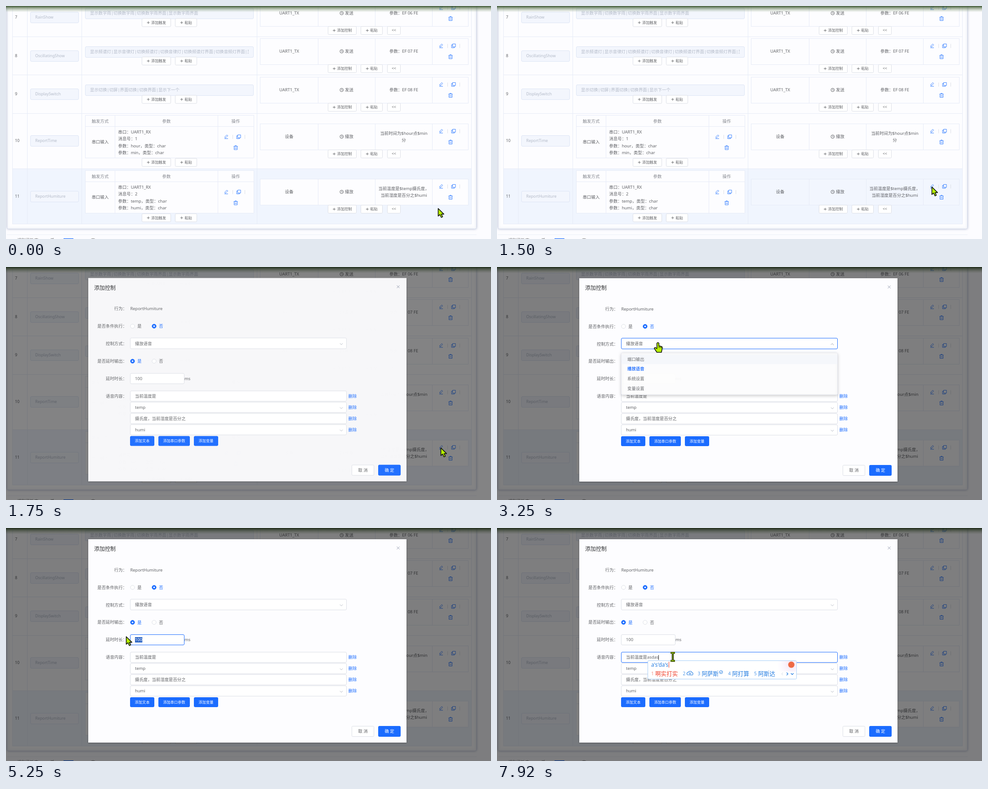
Recreate the animation shown at these times as an HTML page with a canvas. Size 1079x519 px, loop 8 s.

```html
<!DOCTYPE html>
<html lang="zh-CN">
<head>
<meta charset="utf-8">
<style>
html, body { margin: 0; width: 100%; height: 100%; overflow: hidden; background: #fcfcff; }
canvas { display: block; }
</style>
</head>
<body>
<canvas id="stage" width="1079" height="519"></canvas>
<script>
const ctx = document.getElementById('stage').getContext('2d');
const W = 1079, H = 519, LOOP = 8000;
const FAMILY = '"Noto Sans", "Noto Sans CJK SC", "Noto Sans CJK", sans-serif';
const BLUE = '#1b6cff', TEXT = '#606266', LINE = '#dcdfe6', GRID = '#e6ebf7', LIME = '#b8f400';

const clamp = (v, a = 0, b = 1) => Math.min(b, Math.max(a, v));
const ramp = (t, start, length) => clamp((t - start) / length);
const easeOut = (p, n) => 1 - Math.pow(1 - p, n);

// ---- drawing helpers ----
function text(str, x, cy, { size = 9.4, color = TEXT, align = 'left', weight = 400 } = {}) {
  ctx.font = `${weight} ${size}px ${FAMILY}`;
  ctx.textAlign = align;
  ctx.fillStyle = color;
  ctx.fillText(str, x, cy + size * 0.36);
}

function box(x, y, x2, y2, fill, stroke, r = 2.5) {
  ctx.beginPath();
  ctx.roundRect(x + 0.5, y + 0.5, x2 - x - 1, y2 - y - 1, r);
  if (fill) { ctx.fillStyle = fill; ctx.fill(); }
  if (stroke) { ctx.strokeStyle = stroke; ctx.lineWidth = 1; ctx.stroke(); }
}

function rect(x, y, x2, y2, fill) {
  ctx.fillStyle = fill;
  ctx.fillRect(x, y, x2 - x, y2 - y);
}

const hline = (y, x, x2, color = GRID) => rect(x, y, x2, y + 1, color);
const vline = (x, y, y2, color = GRID) => rect(x, y, x + 1, y2, color);

function stroke(d, x, y, color, width = 1) {
  ctx.save();
  ctx.translate(x, y);
  ctx.strokeStyle = color;
  ctx.lineWidth = width;
  ctx.lineJoin = 'round';
  ctx.stroke(new Path2D(d));
  ctx.restore();
}

function disc(x, y, r, fill, border) {
  ctx.beginPath();
  ctx.arc(x, y, r, 0, 7);
  ctx.fillStyle = fill;
  ctx.fill();
  if (border) { ctx.strokeStyle = border; ctx.lineWidth = 1; ctx.stroke(); }
}

// ---- page behind the dialog ----
function icons(x, y) {
  const c = '#3b82ff';
  stroke('M-3 2.5 L-3 0.5 L1.5 -4 L3.5 -2 L-1 2.5 Z M-4 4.5 H4', x, y, c);
  stroke('M-2 -4 H4.5 V2.5 H-2 Z M-2 -2 H-4.3 V4.5 H2.2 V2.5', x + 27.5, y, c);
  stroke('M-4.5 -3 H4.5 M-1.5 -3 V-4.5 H1.5 V-3 M-3.5 -3 V4.5 H3.5 V-3 M-1.2 -0.5 V2.5 M1.2 -0.5 V2.5', x + 21, y + 24.5, c);
  vline(x + 14, y - 4, y + 5, LINE);
  vline(x + 41, y - 4, y + 5, LINE);
}

function smallButton(label, x, x2, cy, plus = true) {
  box(x, cy - 9.5, x2, cy + 9.5, '#fff', LINE, 2);
  const mid = (x + x2) / 2;
  text(label, mid + (plus ? 5 : 0), cy, { size: 8.2, align: 'center' });
  if (plus) {
    const w = label.length * 4.1;
    stroke('M-3 0 H3 M0 -3 V3', mid - w - 1.5, cy, TEXT, 0.9);
  }
}

function triggerTable(y, lines) {
  rect(176, y, 551, y + 95, '#fdfdff');
  [0, 25, 95].forEach(d => hline(y + d, 176, 551));
  [176, 242, 471, 551].forEach(x => vline(x, y, y + 95));
  const head = { align: 'center', color: '#85888f', weight: 500 };
  text('触发方式', 209.5, y + 13.5, head);
  text('参数', 357, y + 13.5, head);
  text('操作', 511, y + 13.5, head);
  text('串口输入', 209.5, y + 60, { align: 'center' });
  lines.forEach((s, i) => text(s, 249.5, y + 37.5 + i * 15.4));
  icons(490, y + 48);
}

function controlTable(cy, device, action, params, hover) {
  const top = cy - 29, end = cy + 29;
  rect(565, top, 1028, end, '#fdfdff');
  if (hover) { ctx.globalAlpha = hover; rect(565, top, 1028, end, '#f2f6fe'); ctx.globalAlpha = 1; }
  hline(top, 565, 1028);
  hline(end, 565, 1029);
  [565, 694, 821, 948, 1028].forEach(x => vline(x, top, end));
  text(device, 630, cy, { align: 'center' });
  disc(746.8, cy, 3.8, 'transparent', TEXT);
  stroke('M0 -2.2 V0.3 H2', 746.8, cy, TEXT, 0.9);
  text(action, 754, cy);
  params.forEach((s, i) => text(s, 885, cy + (i - (params.length - 1) / 2) * 15.5, { align: 'center' }));
  icons(968, cy - 12.5);
  smallButton('添加控制', 716, 780, cy + 38.5);
  smallButton('粘贴', 789, 838, cy + 38.5);
  smallButton('<<', 848, 878, cy + 38.5, false);
}

const uart = code => ['UART1_TX', '发送', [`参数：EF ${code} FE`]];
const rows = [
  { no: 7, name: 'RainShow', y: 25, words: '显示数字雨|切换数字雨|切换数字雨界面|显示数字雨界面', control: uart('06') },
  { no: 8, name: 'OscillatingShow', y: 110.5, words: '显示频谱灯|显示音律灯|切换频谱灯|切换音律灯|切换频谱灯界面|切换音频灯界面|显示音律灯', control: uart('07') },
  { no: 9, name: 'DisplaySwitch', y: 196, words: '显示切换|切屏|界面切换|切换界面|显示下一个', control: uart('08') },
  { no: 10, name: 'ReportTime', y: 300, lines: ['串口：UART1_RX', '消息号：1', '参数：hour，类型：char', '参数：min，类型：char'],
    control: ['设备', '播放', ['当前时间为$hour点$min', '分']] },
  { no: 11, name: 'ReportHumiture', y: 423.5, lines: ['串口：UART1_RX', '消息号：2', '参数：temp，类型：char', '参数：humi，类型：char'],
    control: ['设备', '播放', ['当前温度是$temp摄氏度，', '当前湿度是百分之$humi']] }
];

function drawRow(row, hover) {
  const { y } = row, name = Math.round(y), pale = { color: '#b3bac8', size: 8.8 };
  text(row.no, 20, y, { size: 8.8 });
  box(54, name - 12, 162, name + 13, '#f3f6fd', '#dde5f5');
  text(row.name, 65, y, pale);
  if (row.words) {
    box(176, name - 21, 551, name + 4, '#f3f6fd', '#dde5f5');
    ctx.save();
    ctx.beginPath();
    ctx.rect(180, y - 25, 360, 30);
    ctx.clip();
    text(row.words, 187, y - 9, { color: '#b3bac8' });
    ctx.restore();
  } else {
    triggerTable(Math.round(y - 57.2), row.lines);
  }
  const by = y + (row.words ? 12 : 48.3);
  smallButton('添加触发', 302, 367, by);
  smallButton('粘贴', 376, 425, by);
  controlTable(Math.round(y - 9.3) + 0, ...row.control, hover);
}

function drawPage(t) {
  rect(0, 0, W, H, '#fcfcff');
  ctx.save();
  ctx.shadowColor = 'rgba(60,80,130,.3)';
  ctx.shadowBlur = 5;
  box(2, -10, 1047, 497, '#fdfdff', '#d3daea', 3);
  ctx.restore();
  hline(509, 2, 1047, '#eceff8');
  rect(14, 363, 1035, 486, '#f0f5fe');
  [68, 153, 239, 362, 485].forEach(y => hline(y, 14, 1036));
  [14, 47, 168, 558, 1035].forEach(x => vline(x, 0, 486));
  const hover = ramp(t, 80, 250) * (1 - ramp(t, 1520, 200));
  rows.forEach(row => drawRow(row, row.no === 11 ? hover : 0));

  text('识别灵敏度', 25, 522);
  text('低', 98, 522);
  stroke('M0 0 H22', 128, 518.5, BLUE, 1.5);
  text('高', 189, 522);

  const g = ctx.createLinearGradient(0, 0, 0, 14);
  g.addColorStop(0, 'rgba(48,76,38,.95)');
  g.addColorStop(0.35, 'rgba(95,120,82,.6)');
  g.addColorStop(1, 'rgba(160,180,150,0)');
  ctx.fillStyle = g;
  ctx.fillRect(0, 0, W, 14);
}

// ---- dialog ----
function radio(x, cy, label, on) {
  disc(x + 5, cy, 4.6, on ? BLUE : '#fff', on ? BLUE : LINE);
  if (on) disc(x + 5, cy, 1.8, '#fff');
  text(label, x + 15.7, cy, { color: on ? BLUE : TEXT });
}

function chevron(x, y, angle = 0) {
  ctx.save();
  ctx.translate(x, y);
  ctx.rotate(angle);
  stroke('M-3.2 -1.6 L0 1.6 L3.2 -1.6', 0, 0, '#b4b9c4', 1);
  ctx.restore();
}

function blueButton(label, x, x2, y, y2, size) {
  box(x, y, x2, y2, BLUE, BLUE, 2);
  text(label, (x + x2) / 2, (y + y2) / 2, { size, color: '#fff', align: 'center', weight: 500 });
}

const typedAt = [[7160, 'a'], [7245, 'as'], [7325, 'asd'], [7745, 'asda'], [7825, 'asdas']];
const typed = t => typedAt.reduce((s, [at, v]) => (t >= at ? v : s), '');
const openness = t => t < 3430 ? easeOut(ramp(t, 3115, 300), 5) : 1 - easeOut(ramp(t, 3430, 300), 5);

function drawDialog(t, pointer) {
  ctx.save();
  ctx.shadowColor = 'rgba(0,0,0,.3)';
  ctx.shadowBlur = 3;
  ctx.shadowOffsetY = 1;
  rect(183, 25, 891, 478, '#fdfdff');
  ctx.restore();
  text('添加控制', 196, 47, { size: 12, color: '#303133' });
  stroke('M-3 -3 L3 3 M3 -3 L-3 3', 872.5, 44.5, '#8f97ab');

  ['行为', '是否条件执行', '控制方式', '是否延时输出', '延时时长', '语音内容']
    .forEach((s, i) => text(s + '：', 269, 93.5 + i * 38.85, { align: 'right' }));
  text('ReportHumiture', 276.5, 93.5);
  radio(276.5, 132.3, '是', false);
  radio(324.5, 132.3, '否', true);
  radio(276.5, 210.2, '是', true);
  radio(324.5, 210.2, '否', false);

  const over = (x, y, x2, y2) =>
    pointer.x > x && pointer.x < x2 && pointer.y > y && pointer.y < y2 ? '#c0c4cc' : LINE;
  box(276, 158, 758, 183, '#fff', t >= 3080 && t < 5080 ? BLUE : over(276, 158, 758, 183));
  text('播放语音', 287, 170.7);
  chevron(746, 172, -Math.PI * openness(t));

  const delayOn = t >= 5080 && t < 6330;
  box(276, 237, 397, 261, '#fff', delayOn ? BLUE : over(276, 237, 397, 261));
  text('100', 287, 249);
  if (delayOn) {
    const left = t < 5245 ? clamp(pointer.x, 287, 303) : 287;
    ctx.save();
    ctx.beginPath();
    ctx.rect(left, 243, 303.3 - left, 12);
    ctx.clip();
    rect(287, 243, 304, 255, '#2c64c4');
    text('100', 287, 249, { color: '#fff' });
    ctx.restore();
  }
  text('ms', 397, 249);

  const voiceOn = t >= 6330;
  const voice = '当前温度是' + typed(t);
  [voice, 'temp', '摄氏度，当前湿度是百分之', 'humi'].forEach((s, i) => {
    const y = Math.round(276 + i * 24.9);
    const edge = i ? LINE : voiceOn ? BLUE : over(276, 276, 758, 300);
    box(276, y, 758, y + 24, '#fff', edge);
    text(s, 287, y + 11.8);
    if (!i && voiceOn) vline(287 + Math.round(ctx.measureText(voice).width), 283, 294, '#222');
    if (i % 2) chevron(746, y + 13.5);
    text('删除', 761.5, y + 11.8, { color: BLUE });
  });

  blueButton('添加文本', 276, 330, 377, 399, 8.2);
  blueButton('添加串口参数', 339, 409, 377, 399, 8.2);
  blueButton('添加变量', 418, 472, 377, 399, 8.2);
  box(769, 441, 819, 465, '#fff', LINE, 2);
  text('取 消', 794, 453, { align: 'center' });
  blueButton('确 定', 828, 878, 441, 465, 9.4);
}

function drawOptions(t) {
  const open = openness(t);
  if (open < 0.01) return;
  ctx.save();
  ctx.globalAlpha = open;
  ctx.translate(0, 191);
  ctx.scale(1, open);
  ctx.shadowColor = 'rgba(0,0,0,.2)';
  ctx.shadowBlur = 6;
  ctx.shadowOffsetY = 2;
  box(276, 0, 758, 99, '#fff', '#e6e9f1');
  ctx.shadowColor = 'transparent';
  rect(277, 4, 757, 26.8, '#f5f7fb');
  ['端口输出', '播放语音', '系统设置', '变量设置'].forEach((s, i) =>
    text(s, 290, 15.4 + i * 22.8, i === 1 ? { color: BLUE, weight: 700 } : {}));
  ctx.restore();
}

// ---- input method popup: * is the cloud entry, ! adds a tick ----
const candidates = {
  a: ["a", '啊', '阿', '呵', '爱', '吖'],
  as: ["a's", '啊是', '爱上', '暗示', '按时', '安神'],
  asd: ["a's'd", '啊实打', '爱上的!', '啊师弟弟', '暗示的', '按时到达'],
  asda: ["a's'da", '啊实打', '*', '爱上大!', '阿打算', '按时达'],
  asdas: ["a's'da's", '啊实打实', '*', '阿萨斯!', '阿打算', '阿斯达']
};

function drawInputMethod(t) {
  const key = typed(t);
  if (!key) return;
  const [spelling, ...words] = candidates[key];
  const ink = '#1f7ae0', size = 12.6;
  const wordWidth = w => (w === '*' ? 14 : w.replace('!', '').length * size);
  const advance = w => 9 + wordWidth(w) + (w === '*' ? 10 : w.endsWith('!') ? 21 : 11);
  const end = 343 + words.reduce((sum, w) => sum + advance(w), 0) - 11;

  box(335, 295, end + 48, 337, '#fff', '#a5cdf7', 2);
  const glow = ctx.createRadialGradient(end + 36, 304, 2, end + 36, 304, 32);
  glow.addColorStop(0, '#f6e6f4');
  glow.addColorStop(1, 'rgba(246,240,255,0)');
  ctx.fillStyle = glow;
  ctx.fillRect(end + 4, 296, 43, 24);
  disc(end + 36, 304.5, 7, '#ee6a45');

  text(spelling, 343, 304.5, { size: 11.8, color: ink });
  vline(344 + Math.round(ctx.measureText(spelling).width), 298, 311, '#f0402c');
  let x = 343;
  words.forEach((w, i) => {
    text(i + 1, x, 324.5, { size: 10, color: i ? '#4f98ea' : '#f58a7e' });
    if (w === '*') {
      stroke('M-6 3 C-9 -1 -4 -4 -3 -3 C-1 -7 5 -4 4 -2 C8 -2 7 4 4 3.5 Z', x + 16, 324, ink, 1.1);
      disc(x + 16, 324, 1.6, '#fff', ink);
    } else {
      text(w.replace('!', ''), x + 9, 324.5, { size, color: i ? ink : '#f0402c' });
    }
    if (w.endsWith('!')) {
      disc(x + 52, 321, 3.5, '#fff', ink);
      stroke('M-1.7 0 L-0.4 1.4 L1.8 -1.4', x + 52, 321, ink, 0.9);
    }
    x += advance(w);
  });
  stroke('M1.5 -3 L-1.5 0 L1.5 3', end + 16, 325, '#ccd6e4');
  stroke('M-1.5 -3 L1.5 0 L-1.5 3', end + 27, 325, ink, 1.2);
  stroke('M-3 -1.5 L0 1.5 L3 -1.5', end + 38, 325, ink, 1.2);
}

// ---- pointer ----
const track = [
  [0, 961, 451, 'arrow'], [330, 970, 404], [500, 975, 381], [833, 980, 420], [1000, 962, 399], [1250, 967, 403],
  [1917, 967, 403], [2330, 690, 240], [2580, 420, 121], [2750, 358, 168, 'hand'],
  [3420, 358, 168], [3600, 325, 183, 'arrow'], [3833, 288, 196], [4000, 317, 213], [4333, 317, 213],
  [4580, 310, 238, 'beam'], [4750, 306, 249], [5000, 306, 249], [5250, 267, 242, 'arrow'],
  [5400, 286, 248, 'beam'], [5583, 300, 253], [5667, 300, 253], [6250, 330, 287], [6500, 330, 287], [6830, 391, 287]
];

function pointerAt(t) {
  let i = 0, kind = 'arrow';
  while (i < track.length && track[i][0] <= t + 1) kind = track[i++][3] || kind;
  const a = track[i - 1], b = track[i] || a;
  const p = a === b ? 0 : clamp((t - a[0]) / (b[0] - a[0]));
  return { x: a[1] + (b[1] - a[1]) * p, y: a[2] + (b[2] - a[2]) * p, kind };
}

const shapes = {
  arrow: 'M0.5 0 V17 L4.3 13.6 L7.4 20 L10.4 18.6 L7.6 12.6 H13.2 Z',
  hand: 'M-2.3 2 Q0 -1.4 2.3 2 V7.5 L8 9 Q10.3 9.8 9.7 13 L7.8 22 H-2.4 L-8 13.5 Q-7.5 10.3 -4.6 12 L-2.3 14 Z',
  beam: 'M-5 -9 H5 M-5 9 H5 M0 -9 V9'
};

function drawPointer({ x, y, kind }) {
  if (kind === 'beam') {
    stroke(shapes.beam, x, y, '#000', 4.2);
    stroke(shapes.beam, x, y, LIME, 1.4);
    return;
  }
  ctx.save();
  ctx.translate(x, y);
  ctx.fillStyle = LIME;
  ctx.fill(new Path2D(shapes[kind]));
  ctx.restore();
  stroke(shapes[kind], x, y, '#111', 1.6);
  if (kind === 'hand') stroke('M2.3 8 V12 M5 9 V12.5 M7.6 9.5 V13', x, y, '#111', 1);
}

function render(t) {
  const pointer = pointerAt(t);
  drawPage(t);
  const shown = easeOut(ramp(t, 1520, 300), 2.3);
  if (shown > 0) {
    rect(0, 0, W, H, `rgba(0,0,0,${0.5 * shown})`);
    ctx.save();
    ctx.globalAlpha = shown;
    ctx.translate(0, -13.4 * (1 - shown));
    drawDialog(t, pointer);
    ctx.restore();
    drawOptions(t);
    drawInputMethod(t);
  }
  drawPointer(pointer);
}

let last = -1;
const start = performance.now();
function tick() {
  const step = Math.floor(((performance.now() - start) % LOOP + 4) * 0.012);
  if (step !== last) {
    last = step;
    render(Math.min(step, 95) * 1000 / 12);
  }
  requestAnimationFrame(tick);
}
tick();
</script>
</body>
</html>
```
